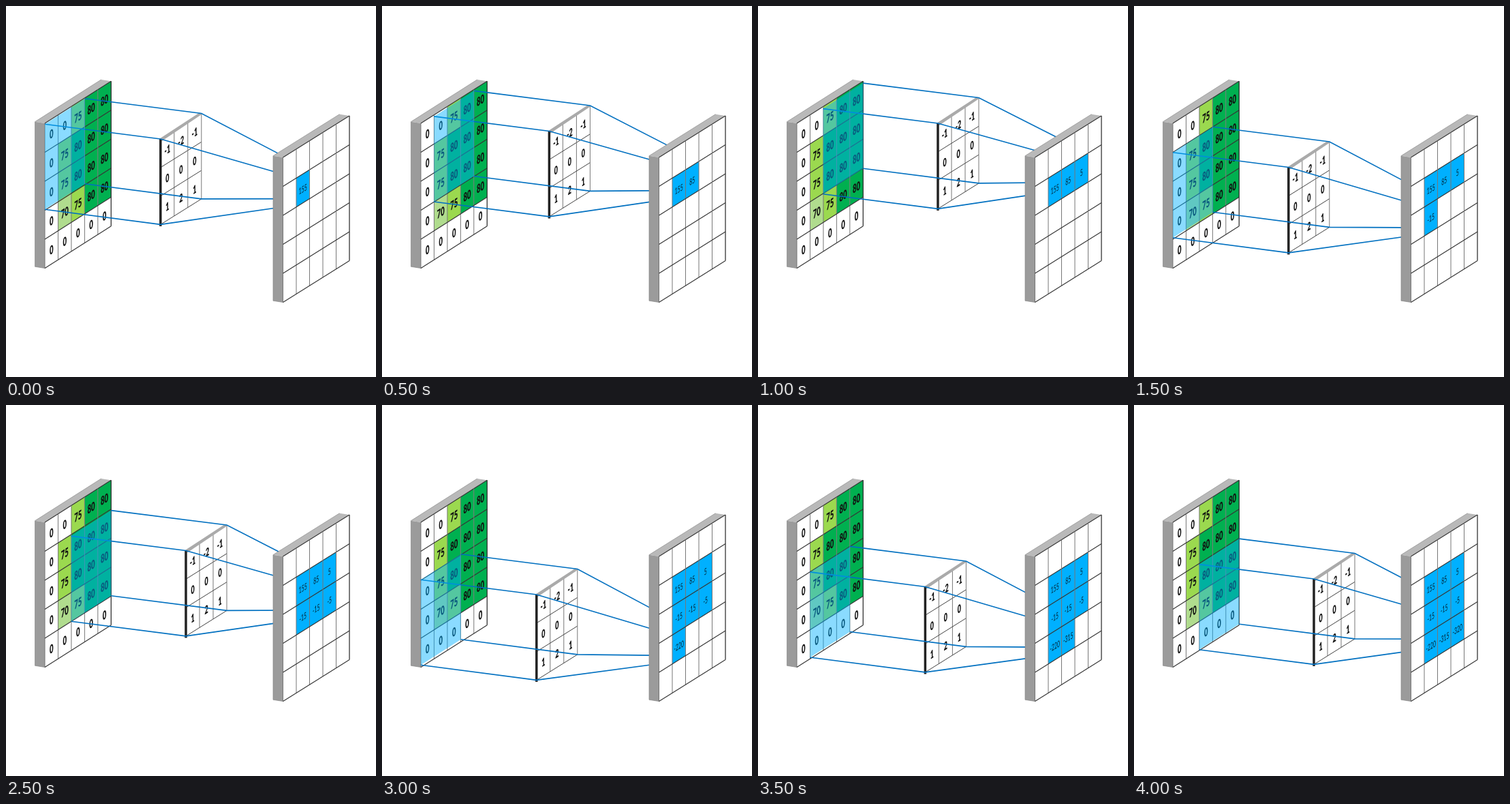
Recreate the animation shown at these times as an HTML page with a canvas. Size 543x544 px, loop 4500 ms.

```html
<!DOCTYPE html>
<html lang="en">
<head>
<meta charset="utf-8">
<title>Convolution</title>
<style>
  html, body { margin: 0; width: 100%; height: 100%; overflow: hidden; background: #fff; }
  canvas { display: block; }
</style>
</head>
<body>
<canvas id="stage" width="543" height="544"></canvas>
<script>
const ctx = document.getElementById('stage').getContext('2d');
const STEP = 500, SIZE = 3;
const BLUE = '#00b0ff', LINE = '#0070c0';

const input = [
  [0, 0, 75, 80, 80],
  [0, 75, 80, 80, 80],
  [0, 75, 80, 80, 80],
  [0, 70, 75, 80, 80],
  [0, 0, 0, 0, 0],
];
const kernel = [[-1, -2, -1], [0, 0, 0], [1, 2, 1]];
const output = [155, 85, 5, -15, -15, -5, -220, -315, -320];
const cellColors = { 0: '#fff', 70: '#b0dc8e', 75: '#9bd94f', 80: '#00b050' };

// A plane has a top-left corner, a column vector (ux, uy) and a row height v.
const inputPlane = { x: 57, y: 172, ux: 19.45, uy: -12.35, v: 42.5, n: 5 };
const outputPlane = { x: 406.5, y: 222, ux: 19.5, uy: -12.2, v: 42.5, n: 5 };

const at = (p, col, row) => [p.x + col * p.ux, p.y + col * p.uy + row * p.v];

function corners(p, col = 0, row = 0, span = 1) {
  return [at(p, col, row), at(p, col + span, row),
          at(p, col + span, row + span), at(p, col, row + span)];
}

function fill(points, color) {
  ctx.fillStyle = color;
  ctx.beginPath();
  points.forEach(([x, y]) => ctx.lineTo(x, y));
  ctx.fill();
}

function line(points, color, width) {
  ctx.strokeStyle = color;
  ctx.lineWidth = width;
  ctx.beginPath();
  points.forEach(([x, y]) => ctx.lineTo(x, y));
  ctx.stroke();
}

function gridLines(p) {
  for (let i = 0; i <= p.n; i++) {
    const edge = i === p.n;
    line([at(p, i, 0), at(p, i, p.n)], edge ? '#333' : '#777', edge ? 1.3 : 1);
    line([at(p, 0, i), at(p, p.n, i)], '#333', 1.1);
  }
}

function label(p, col, row, text, font, squeeze, color) {
  const [x, y] = at(p, col + 0.5, row + 0.5);
  ctx.save();
  ctx.transform(squeeze, squeeze * p.uy / p.ux, 0, 1, x, y + 0.7);
  ctx.font = font + ' Lato, "Open Sans", sans-serif';
  ctx.textAlign = 'center';
  ctx.fillStyle = color;
  const box = ctx.measureText('0');
  ctx.fillText(text, 0, box.actualBoundingBoxAscent / 2);
  ctx.restore();
}

function slab(p) {
  const [tl, tr, br, bl] = corners(p, 0, 0, p.n);
  const back = ([x, y]) => [x - 14.5, y - 2.3];
  fill([back(tl), back(tr), tr, tl], '#b9b9b9');
  fill([back(tl), tl, bl, back(bl)], '#9b9b9b');
  line([back(tr), back(tl), back(bl), bl], '#888', 0.7);
  fill([tl, tr, br, bl], '#fff');
}

function drawInput() {
  slab(inputPlane);
  input.forEach((values, row) => values.forEach((value, col) =>
    fill(corners(inputPlane, col, row), cellColors[value])));
  gridLines(inputPlane);
  input.forEach((values, row) => values.forEach((value, col) =>
    label(inputPlane, col, row, value, '900 17.5px', 0.54, '#111')));
}

function drawKernel(p) {
  const [tl, tr, br, bl] = corners(p, 0, 0, SIZE);
  fill([tl, tr, br, bl], '#fff');
  for (let i = 1; i <= SIZE; i++) {
    line([at(p, i, 0), at(p, i, SIZE)], '#777', 1);
    line([at(p, 0, i), at(p, SIZE, i)], '#444', 1);
  }
  fill([[tl[0] - 2, tl[1]], [tr[0] - 3, tr[1] - 1], [tr[0] + 1, tr[1] + 1], [tl[0] + 2, tl[1] + 3]], '#aaa');
  line([[tl[0], tl[1]], [bl[0], bl[1] + 2.5]], '#222', 3.5);
  kernel.forEach((values, row) => values.forEach((value, col) =>
    label(p, col, row, value, '900 16.5px', 0.54, '#111')));
}

function drawOutput(step) {
  slab(outputPlane);
  const shown = output.slice(0, step + 1);
  const cell = i => [1 + i % SIZE, 1 + Math.floor(i / SIZE)];
  shown.forEach((_, i) => fill(corners(outputPlane, ...cell(i)), BLUE));
  gridLines(outputPlane);
  shown.forEach((value, i) =>
    label(outputPlane, ...cell(i), value, '13px', 0.52, '#04202f'));
}

function draw(step) {
  const col = step % SIZE, row = Math.floor(step / SIZE);
  const windowPlane = { x: 57 + 19.3 * col, y: 173.2 - 11.3 * col + 41.5 * row, ux: 19.6, uy: -12.5, v: 41.7 };
  const kernelPlane = { x: 226.8 + 18.6 * col, y: 195 - 11.5 * col + 41.5 * row, ux: 20, uy: -12.5, v: 41.8 };

  ctx.fillStyle = '#fff';
  ctx.fillRect(0, 0, 543, 544);
  drawInput();
  drawKernel(kernelPlane);

  const from = corners(windowPlane, 0, 0, SIZE);
  const through = corners(kernelPlane, 0, 0, SIZE);
  const to = corners(outputPlane, col + 1, row + 1);
  to[3][1] -= 3;
  from.forEach((point, i) => line([point, through[i], to[i]], LINE, 1.6));

  ctx.globalAlpha = 0.46;
  fill(from, BLUE);
  ctx.globalAlpha = 1;
  drawOutput(step);
}

function tick() {
  draw(Math.floor(performance.now() / STEP) % output.length);
  requestAnimationFrame(tick);
}
tick();
</script>
</body>
</html>
```
